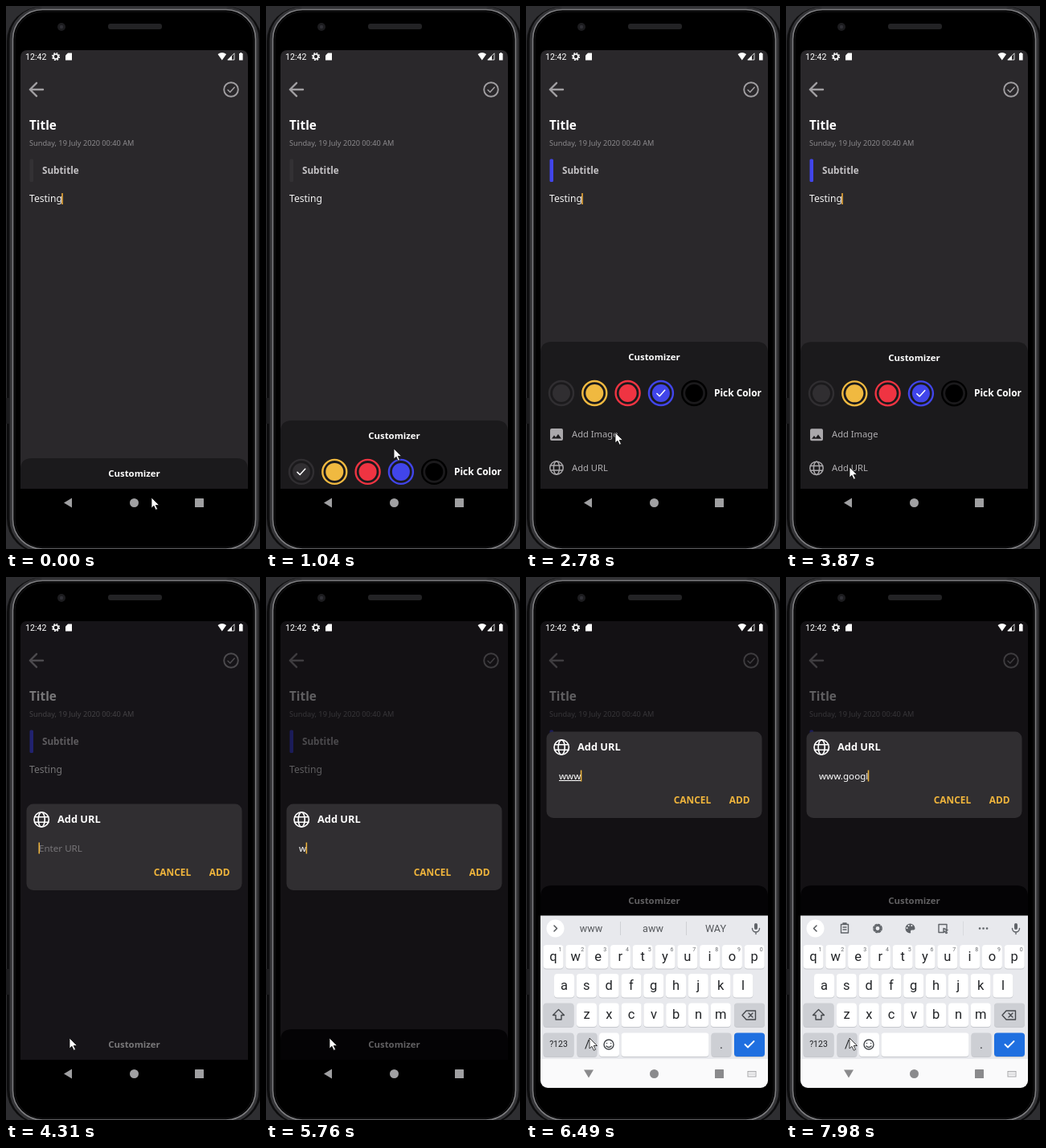
An HTML page for the animation above (8 s loop, 316 by 676 pixels).

```html
<!DOCTYPE html>
<html lang="en">
<head>
<meta charset="utf-8">
<title>Note editor</title>
<style>
  html, body { margin: 0; width: 100%; height: 100%; overflow: hidden; background: #2e2e31; }
  svg { display: block; width: 316px; height: 676px; }
  text { font-family: "Noto Sans", "Open Sans", sans-serif; }
  .roboto text, text.roboto { font-family: Roboto, sans-serif; }
  .mid { text-anchor: middle; }
  .line { fill: none; stroke-linecap: round; stroke-linejoin: round; }
</style>
</head>
<body>
<svg viewBox="0 0 316 676">
  <defs>
    <clipPath id="appClip"><path d="M18 601V64q0-9 9-9h265q9 0 9 9v537z"/></clipPath>
    <clipPath id="screenClip"><rect x="18" y="55" width="283" height="581" rx="9"/></clipPath>
    <g id="globe" class="line" stroke-width="1.5">
      <circle r="8.2"/><ellipse rx="3.6" ry="8.2"/><path d="M-7.6-2.9H7.6M-7.6 2.9H7.6"/>
    </g>
    <g id="gear" fill="none" stroke="currentColor">
      <circle r="3" stroke-width="1.7"/><circle r="4.4" stroke-width="1.4" stroke-dasharray="1.9 1.56"/>
    </g>
  </defs>

  <!-- phone body -->
  <rect width="316" height="676" fill="#2e2e31"/>
  <rect x="1" y="1" width="317" height="680" rx="43" fill="#0d0d0e"/>
  <rect y="488" width="4" height="32" fill="#1c1c1e"/>
  <g fill="none">
    <rect x="6.5" y="3" width="306" height="675" rx="39" stroke="#343437" stroke-width="4"/>
    <rect x="8.5" y="4.5" width="302" height="671.5" rx="37" fill="#000" stroke="#7c7c7f" stroke-width="1.6"/>
    <rect x="11" y="7" width="297" height="667" rx="35" stroke="#161618"/>
  </g>
  <rect x="127" y="22" width="67" height="7" rx="3" fill="#232325"/>
  <circle cx="69" cy="26" r="5" fill="#1c1c1f"/><circle cx="69" cy="26" r="2.2" fill="#303036"/>

  <g clip-path="url(#appClip)">
    <rect x="18" y="55" width="283" height="546" fill="#2a282b"/>
    <g class="line" stroke="#a09ea1">
      <path d="M46 104H30m8-8.2-8.2 8.2 8.2 8.2" stroke-width="2.4"/>
      <circle cx="280" cy="104" r="8.8" stroke-width="1.9"/><path d="m276 104.5 2.8 2.8 5.4-6" stroke-width="1.5"/>
    </g>
    <text x="29" y="154" font-size="15.3" font-weight="700" fill="#fff">Title</text>
    <text x="29" y="174" font-size="9.2" fill="#8b898c">Sunday, 19 July 2020 00:40 AM</text>
    <rect id="stripe" x="29.5" y="190.5" width="4.5" height="28.5" rx="1.5"/>
    <text x="45" y="209" font-size="11.7" font-weight="600" fill="#c4c2c5">Subtitle</text>
    <text x="29" y="244" font-size="12.1" fill="#f4f4f4">Testing</text>
    <rect id="noteCaret" x="69.2" y="233" width="1.6" height="14" fill="#e9a838"/>
    <g id="sheet">
      <path id="sheetBack" d="M18 800V432q0-14 14-14h255q14 0 14 14v368z"/>
      <text class="mid" x="159.5" y="441.3" font-size="11.4" font-weight="600" fill="#fff">Customizer</text>
      <g id="swatches"></g>
      <path id="tick" class="line" d="m-5 .5 3.2 3.2 6.6-7.4" stroke="#fff" stroke-width="1.5"/>
      <text x="234" y="486" font-size="11.9" font-weight="600" fill="#fff">Pick Color</text>
      <path fill="#aaa8ab" fill-rule="evenodd" d="M32 526h12q2 0 2 2v11q0 2-2 2H32q-2 0-2-2v-11q0-2 2-2zm0 12.5h12l-4-5.4-3 4-2-2.5z"/>
      <use href="#globe" x="38" y="575" stroke="#aaa8ab"/>
      <g font-size="11.2" font-weight="500" fill="#b0aeb1">
        <text x="57" y="537">Add Image</text><text x="57" y="579">Add URL</text>
      </g>
    </g>
    <rect id="dim" x="18" y="55" width="283" height="546" fill="#070509"/>

    <g id="dialog">
      <rect x="25.5" y="282.5" width="268" height="107.5" rx="8.5" fill="#302e31"/>
      <use href="#globe" stroke="#fff" transform="translate(44.2 302) scale(1.12)"/>
      <text x="64" y="306.3" font-size="12.8" font-weight="700" fill="#fff">Add URL</text>
      <text id="hint" x="41" y="341.5" font-size="11.6" fill="#777578">Enter URL</text>
      <text id="entry" x="41" y="341.5" font-size="11.6" fill="#fff"></text>
      <rect id="underline" x="41" y="343" height="1" fill="#fff"/>
      <rect id="urlCaret" y="330.5" width="1.5" height="14" fill="#f0b53c"/>
      <g font-size="11.9" font-weight="600" fill="#f0b53c">
        <text x="183.8" y="372.3">CANCEL</text><text x="252.8" y="372.3">ADD</text>
      </g>
    </g>
  </g>

  <!-- status bar -->
  <g fill="#fff" color="#fff">
    <text class="roboto" x="24" y="67" font-size="10.6">12:42</text>
    <use href="#gear" x="62" y="63"/>
    <path d="M77 58.5h5v9h-8v-6z"/>
    <path d="M263.5 60q5.3-4 10.6 0l-5.3 7.4z"/>
    <path d="M275.5 67.3h5.5v-5.5z"/><path d="m275.8 67 8.2-8.2V67z" fill="none" stroke="#fff" stroke-width=".8"/>
    <path d="M290 59h1.3v-1h2v1h1.3v8.4H290z"/>
  </g>

  <g clip-path="url(#screenClip)">
    <g id="keyboard" class="roboto">
      <rect x="18" y="421.5" width="283" height="180" fill="#e8e9ed"/>
      <rect x="18" y="600" width="283" height="40" fill="#fafafb"/>
      <circle cx="36.5" cy="437.5" r="11" fill="#fff"/>
      <path id="chevron" class="line" stroke="#55585c" stroke-width="1.5"/>
      <g id="suggestions" class="mid" font-size="12.6" fill="#55585c">
        <text x="81" y="442">www</text><text x="158" y="442">aww</text><text x="236" y="442">WAY</text>
        <path d="M117.5 429v17M199.5 429v17" stroke="#cfd1d5"/>
      </g>
      <g id="tools" class="line" stroke="#5f6368" stroke-width="1.4" color="#5f6368">
        <path d="M68.5 432.5h9V443h-9zm2.5 0V431h4v1.5M71 436h4m-4 3h4"/>
        <use href="#gear" transform="translate(114 437.5) scale(1.15)"/>
        <path d="M154.5 443.5a6 6 0 1 1 6-6q0 2-3 2-3-.5-2.5 2 .5 2-.5 2z" fill="#5f6368" stroke="none"/>
        <path d="M150.5 437h.1m2-3h.1m3.6 0h.1" stroke="#e8e9ed" stroke-width="2"/>
        <path d="M195 442.5h-5v-10h10v5m-4 0 5 2-2 1 1.5 2.5-1.5.5-1.5-2.5-1.5 1.5z"/>
        <path d="M220.5 429v17" stroke="#d8dade" stroke-width="1"/>
        <path d="M241 437.5h.1m4.4 0h.1m4.4 0h.1" stroke-width="2.6"/>
      </g>
      <g class="line" stroke="#5f6368" stroke-width="1.4">
        <path d="M286 433v4" stroke-width="4"/><path d="M281.5 437.5a4.5 4.5 0 0 0 9 0M286 442v2.5"/>
      </g>
      <g id="keys"></g>
      <g class="line" stroke="#44474b" stroke-width="1.4">
        <path d="m40.5 538.5 7 7H44v5.500h-7v-5.500h-3.500z"/>
        <path d="M274 540h11.500v11H274l-5-5.500zm3 3 5 5m0-5-5 5"/>
        <circle cx="103" cy="582" r="6"/><path d="M100.500 580.500h.1m5 0h.1M100 584q3 3 6 0"/>
        <path d="m272.500 582 3.500 3.500 7.500-7.500" stroke="#fff" stroke-width="1.8"/>
      </g>
      <g fill="none" stroke="#a5a5a8"><rect x="276" y="615.5" width="10" height="6.5"/>
        <path d="M277.500 617.500h7m-7 2h7" stroke-dasharray="1 1"/></g>
    </g>
  </g>

  <g id="nav">
    <path id="back"/><circle cx="159.5" cy="618.5" r="5.5"/><rect x="235" y="613" width="11" height="11" rx=".6"/>
  </g>
  <path id="cursor" d="M0 0v13l3-2.700 2.300 5 2.200-1-2.300-4.800h4.300z" fill="#fff" stroke="#111" stroke-width=".8"/>
</svg>

<script>
const LOOP = 8000;
const el = Object.fromEntries([...document.querySelectorAll("[id]")].map(e => [e.id, e]));
const set = (node, attrs) => { for (const k in attrs) node.setAttribute(k, attrs[k]); };
const show = (node, on) => set(node, { opacity: on ? 1 : 0 });
const shift = (node, x, y) => set(node, { transform: `translate(${x} ${y})` });
const ramp = (t, a, b) => {
  const p = Math.min(1, Math.max(0, (t - a) / (b - a)));
  return p * p * (3 - 2 * p);
};

const swatchX = i => 44 + 41.3 * i;
el.swatches.innerHTML = ["#302e31", "#f0b940", "#ef3442", "#4145ea", "#000"].map((c, i) =>
  `<circle cx="${swatchX(i)}" cy="482" r="15" fill="none" stroke="${c}" stroke-width="2.4"/>
   <circle cx="${swatchX(i)}" cy="482" r="11" fill="${c}"/>`).join("");

function key(x, y, w, label = "", fill = "#fff", size = 16.5) {
  return `<rect x="${x - w / 2}" y="${y - 14}" width="${w}" height="30" rx="4" fill="#c6c8cd"/>
    <rect x="${x - w / 2}" y="${y - 14.5}" width="${w}" height="29.5" rx="4" fill="${fill}"/>
    <text class="mid" x="${x}" y="${y + size * .33}" font-size="${size}" fill="#222427">${label}</text>`;
}
const row = (letters, x, y) => [...letters].map((c, i) => key(x + 27.8 * i, y, 25, c)).join("");
const GREY = "#cdcfd4";
el.keys.innerHTML = row("qwertyuiop", 34, 472.5) + row("asdfghjkl", 47.5, 508.5) + row("zxcvbnm", 75.5, 545)
  + [..."1234567890"].map((c, i) => `<text class="mid" x="${42.5 + 27.8 * i}" y="466" font-size="7" fill="#66696d">${c}</text>`).join("")
  + key(40.5, 545, 38, "", GREY) + key(278, 545, 38, "", GREY)
  + key(40.5, 582, 38, "?123", GREY, 10.5) + key(76, 582, 25, "/", GREY, 15) + key(103.5, 582, 25)
  + key(173, 582, 109) + key(243, 582, 25, ".", GREY, 15) + key(278, 582, 38, "", "#1f6fe0");

// time, x, y
const PATH = [[25, 181, 612], [130, 169, 607], [330, 169, 607], [530, 160, 585], [800, 160, 585],
  [1300, 158, 513], [1620, 158, 513], [1930, 168, 473], [2300, 168, 473], [2780, 111, 531],
  [2890, 102, 536], [3040, 100, 538], [3310, 100, 538], [3560, 79, 574]];
const URL_TEXT = "www.googl";
const TYPED_AT = [5760, 6100, 6330, 6700, 7200, 7420, 7580, 7750, 7920];

function pointer(t) {
  let [, x, y] = PATH[0];
  for (let i = 1; i < PATH.length; i++) {
    const [a, x0, y0] = PATH[i - 1], [b, x1, y1] = PATH[i], p = ramp(t, a, b);
    x += (x1 - x0) * p;
    y += (y1 - y0) * p;
  }
  return [x, y];
}

function draw(t) {
  const opened = ramp(t, 820, 1400) - ramp(t, 3860, 4240);
  const dialog = ramp(t, 3950, 4250);
  const settled = ramp(t, 5240, 5400);
  const keyboard = ramp(t, 5840, 6200);
  const blue = t >= 2090;

  set(el.stripe, { fill: blue ? "#4145ea" : "#333134" });
  shift(el.tick, swatchX(blue ? 3 : 0), 482);
  show(el.noteCaret, t < 3980 && Math.floor((t + 480) / 505) % 2 === 0);
  shift(el.sheet, 0, 145 * (1 - opened) - 179 * keyboard);
  // the sheet fades into the page behind the dialog, then turns black
  const shade = (27 + 15 * dialog) * (1 - settled);
  set(el.sheetBack, { fill: `rgb(${shade},${shade * .95},${shade * 1.02})` });
  set(el.dim, { opacity: .54 * dialog + .1 * settled });

  set(el.dialog, { opacity: dialog });
  shift(el.dialog, 0, -90 * keyboard);
  const count = TYPED_AT.filter(at => t >= at).length;
  el.entry.textContent = URL_TEXT.slice(0, count);
  const width = count ? el.entry.getComputedTextLength() : 0;
  show(el.hint, !count);
  show(el.underline, count > 1 && count < 4);
  set(el.underline, { width });
  set(el.urlCaret, { x: 40.5 + width });
  show(el.urlCaret, t < 4760 || t >= 5250);

  shift(el.keyboard, 0, 216 * (1 - keyboard));
  const suggesting = count === 3;
  show(el.suggestions, suggesting);
  show(el.tools, !suggesting);
  set(el.chevron, { d: suggesting ? "m35 434 3.5 3.5-3.5 3.5" : "m38 434-3.5 3.5 3.5 3.5" });
  set(el.back, { d: keyboard > .1 ? "M72 613.5h12l-6 10z" : "M82 612.5v12l-10-6z" });
  set(el.nav, { fill: keyboard > .1 ? "#8a8a8c" : "#a0a0a2" });
  shift(el.cursor, ...pointer(t));
}

const start = performance.now();
function tick() {
  draw((performance.now() - start) % LOOP);
  requestAnimationFrame(tick);
}
tick();
</script>
</body>
</html>
```
